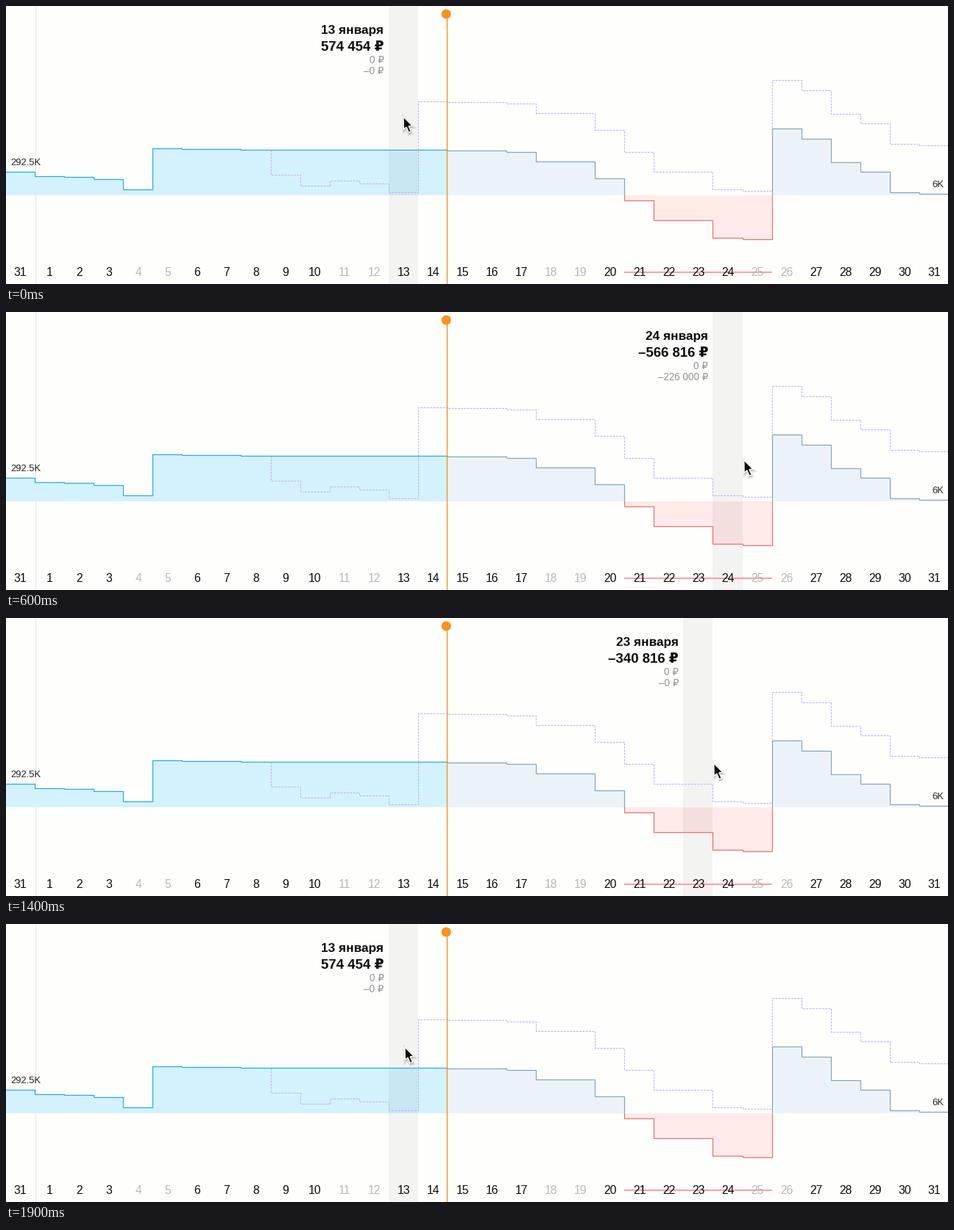
A matplotlib script for the animation above (2200 ms loop, 1280 px wide and 379 px high).

```python
from itertools import accumulate

import matplotlib.pyplot as plt
from matplotlib.animation import FuncAnimation
from matplotlib.patches import Circle, Polygon, Rectangle

W, H, DPI = 1280, 379, 100
STEP_MS, FRAMES = 100, 22
PX = 72 / DPI  # points per pixel
DAYS = range(32)
ZERO_Y, TODAY_X = 258, 598.5

BLUE, STEEL, RED = "#25a9ef", "#84a5b8", "#f26d70"
PURPLE, ORANGE = "#c7b2f3", "#f7931e"
BLACK, GREY, WEEKEND = "#0a0a0a", "#939393", "#b9b9b9"

plt.rcParams["font.family"] = ["Liberation Sans", "DejaVu Sans"]

# Money moved on each day, in thousands; the plan differs by its own entries
START = 292.5
CHANGES = {1: -60.5, 2: -12, 3: -24, 4: -133, 5: 534, 6: -12, 8: -10.5456,
           15: -10, 17: -18, 18: -120, 20: -217.9137, 21: -291.3569,
           22: -258, 24: -226, 25: -20, 26: 1439.8, 27: -133, 28: -304,
           29: -122.5, 30: -267.5, 31: -20}
PLAN_EXTRA = {9: -318, 10: -146, 11: 62, 12: -33, 13: -113, 14: 1180}

# Pointer travel: out and rest, then back
HOME, REST, BACK = (540, 151), (1017, 202), (542, 168)
OUT_STEPS, RETURN_AT, RETURN_STEPS = 9, 12, 6
ARROW = [(0, 0), (0.3, 17.5), (4, 14), (7.3, 21.5), (10.4, 20.2),
         (7.2, 12.8), (12.2, 12.3)]


def running(changes, start=0):
    return list(accumulate((changes.get(d, 0) for d in DAYS), initial=start))[1:]


BALANCE = running(CHANGES, START)
PLAN = [b + extra for b, extra in zip(BALANCE, running(PLAN_EXTRA))]


def edge(day):
    return day * 40.06 - 1


def level(thousands):
    return ZERO_Y - 1.5 - thousands / 9.56


def steps(first, amounts):
    """Corner points of a staircase with one tread per day."""
    xs = [edge(d + side) for d, _ in enumerate(amounts, first) for side in (0, 1)]
    ys = [level(a) for a in amounts for _ in (0, 1)]
    return xs, ys


def money(thousands):
    sign = "–" if thousands < 0 else ""
    return sign + f"{abs(round(thousands * 1000)):,}".replace(",", " ") + " ₽"


def lerp(a, b, t):
    return a + (b - a) * t


def pointer(frame):
    if frame < RETURN_AT:
        left = max(0, 1 - frame / OUT_STEPS)
        return (lerp(REST[0], HOME[0], left ** 3.2),
                lerp(REST[1], HOME[1], left ** 5.4))
    u = min(1, (frame - RETURN_AT) / RETURN_STEPS) ** 1.22
    ease = u ** 3 * (10 - 15 * u + 6 * u * u)
    return lerp(REST[0], BACK[0], ease), lerp(REST[1], BACK[1], ease)


def label(x, y, text, size, color=BLACK, **kw):
    return ax.text(x, y, text, fontsize=size * PX, color=color,
                   va="baseline", zorder=7, **kw)


def line(xs, ys, color, width, **kw):
    return ax.plot(xs, ys, color=color, lw=width * PX,
                   solid_joinstyle="miter", solid_capstyle="butt", **kw)[0]


def zone(left, top, right, bottom, stroke, fill):
    """The part of the balance staircase inside a box, in its own colours."""
    box = Rectangle((left, top), right - left, bottom - top,
                    transform=ax.transData)
    xs, ys = steps(0, BALANCE)
    body = ax.fill_between(xs, ys, ZERO_Y, color=fill, lw=0, zorder=1)
    outline = line(xs, ys, stroke, 1.2, zorder=4)
    for part in (body, outline):
        part.set_clip_path(box)


fig = plt.figure(figsize=(W / DPI, H / DPI), dpi=DPI, facecolor="#fefefd")
ax = fig.add_axes([0, 0, 1, 1])
ax.set(xlim=(0, W), ylim=(H, 0))
ax.axis("off")
ax.set_autoscale_on(False)

line([39.5, 39.5], [0, H], "#e6e6e6", 1, zorder=0)
zone(0, 0, TODAY_X, ZERO_Y, BLUE, "#d3f2fd")
zone(TODAY_X, 0, W, ZERO_Y, STEEL, "#ecf3f8")
zone(TODAY_X, ZERO_Y, W, H, RED, "#ffeaea")

plan_x, plan_y = steps(9, PLAN[9:])
line([plan_x[0]] + plan_x, [level(BALANCE[8])] + plan_y, PURPLE, 1.1,
     zorder=3, dashes=(2.6, 1.3))

line([edge(21), edge(26)], [363, 363], "#fb9fa4", 2, zorder=5)
line([TODAY_X, TODAY_X], [11, H], ORANGE, 1.4, zorder=6)
ax.add_patch(Circle((TODAY_X - 0.3, 11), 6.5, color=ORANGE, lw=0, zorder=6))

for day in DAYS:
    label(edge(day + 0.5) + 0.4, 368, str(day or 31), 15.7,
          WEEKEND if (day - 4) % 7 < 2 else BLACK, ha="center")
label(6, 217, "292.5K", 13, "#222222")
label(1274, 247, "6K", 13, "#222222", ha="right")

band = ax.add_patch(Rectangle((0, 0), edge(1) - edge(0), H, color="black",
                              alpha=0.042, lw=0, zorder=2))
date = label(0, 38, "", 17.3, weight="bold", ha="right")
total = label(0, 61, "", 18.6, weight="bold", ha="right")
income = label(0, 78, "", 13.5, GREY, ha="right")
expense = label(0, 93, "", 13.5, GREY, ha="right")

shadows = [ax.add_patch(Polygon(ARROW, color="black", lw=width * PX,
                                alpha=0.06, zorder=8))
           for width in (1, 3, 5)]
arrow = ax.add_patch(Polygon(ARROW, facecolor="#0c0c0c", edgecolor="white",
                             lw=1.4 * PX, joinstyle="miter", zorder=9))


def place(shape, x, y):
    shape.set_xy([(x + dx, y + dy) for dx, dy in ARROW])


def update(frame):
    x, y = pointer(frame)
    day = int((x - 7.5) / 40.06)
    change = CHANGES.get(day, 0)
    band.set_x(edge(day))
    for text in (date, total, income, expense):
        text.set_x(edge(day) - 6.3)
    date.set_text(f"{day} января")
    total.set_text(money(BALANCE[day]))
    income.set_text(money(max(change, 0)))
    expense.set_text("–" + money(max(-change, 0)))
    for shadow in shadows:
        place(shadow, x + 0.5, y + 2)
    place(arrow, x, y)
    return [band, date, total, income, expense, *shadows, arrow]


anim = FuncAnimation(fig, update, frames=FRAMES, interval=STEP_MS,
                     repeat=True, repeat_delay=0)
plt.show()
```
